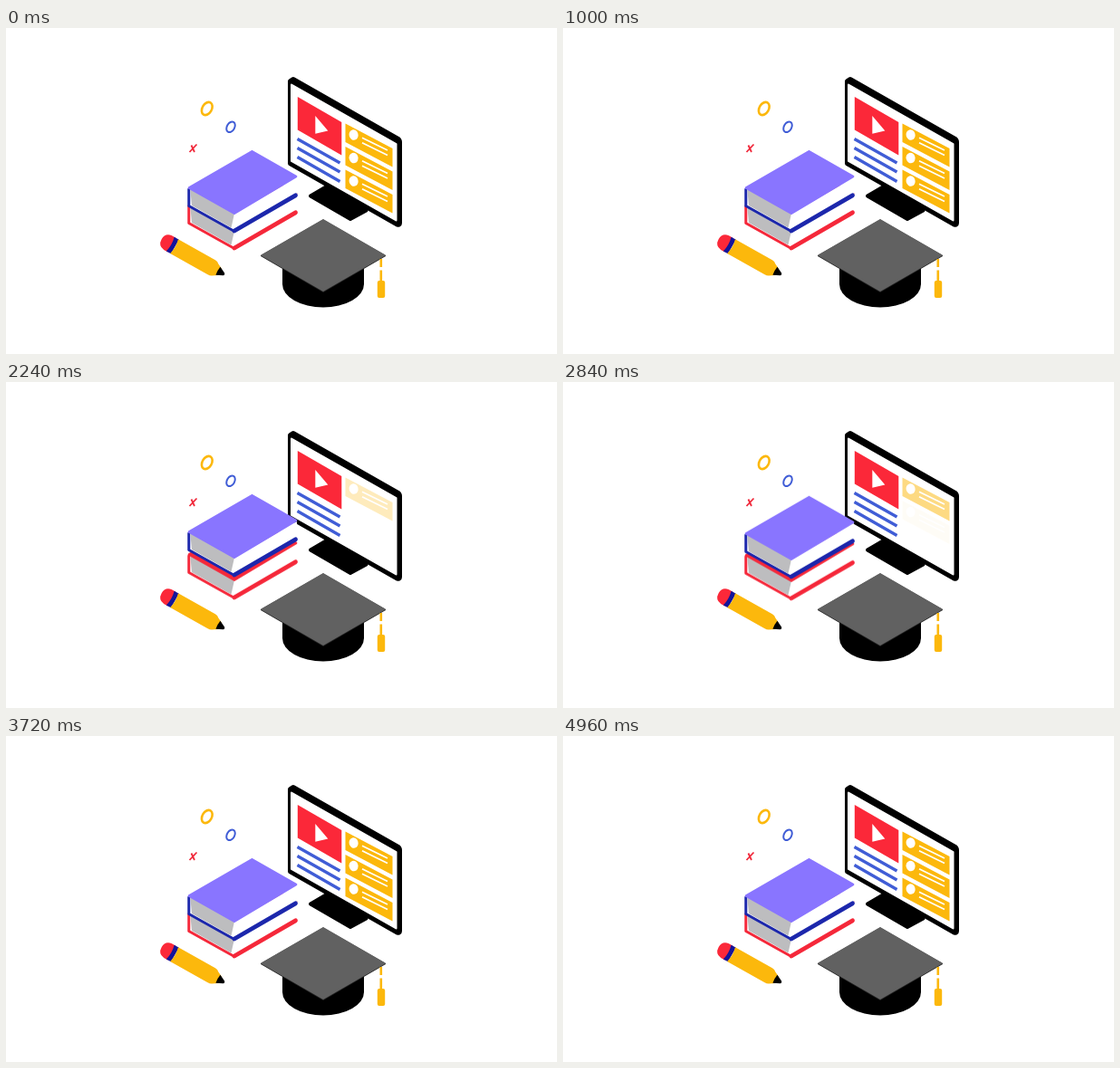
Recreate the animation shown at these times as an HTML page. Size 608 by 360 pixels, loop 5 s.

```html
<!DOCTYPE html>
<html lang="en">
<head>
<meta charset="utf-8">
<title>Online learning</title>
<style>
  html, body { margin: 0; width: 100%; height: 100%; overflow: hidden; background: #fff; }
  svg { display: block; width: 100vw; height: 100vh; }

  .red { fill: #fb2839; }
  .yellow { fill: #fcb80c; }
  .blue-line { fill: none; stroke: #405dd6; }
  .red-line { fill: none; stroke: #f0283a; }
  .yellow-line { fill: none; stroke: #fcb80c; }
  .white-line { fill: none; stroke: #fff; }
  .round { stroke-linejoin: round; stroke-linecap: round; }

  .upper { color: #1c27ac; --lift: -14px; }
  .lower { color: #f5283a; --lift: -6.5px; }
  .book { animation: lift 5s cubic-bezier(.37, 0, .63, 1) infinite; }
  .card1 { animation: card1 5s linear infinite; }
  .card2 { animation: card2 5s linear infinite; }
  .card3 { animation: card3 5s linear infinite; }

  @keyframes lift {
    0%, 33%, 67%, 100% { transform: translateY(0); }
    50% { transform: translateY(var(--lift)); }
  }
  @keyframes card1 {
    0%, 39.8%, 60.2%, 100% { opacity: 1; }
    46.7%, 53.3% { opacity: 0; }
  }
  @keyframes card2 {
    0%, 36.6%, 63.4%, 100% { opacity: 1; }
    43.4%, 56.6% { opacity: 0; }
  }
  @keyframes card3 {
    0%, 33.2%, 66.8%, 100% { opacity: 1; }
    40%, 60% { opacity: 0; }
  }
</style>
</head>
<body>
<svg viewBox="0 0 608 360">
  <defs>
    <g id="card">
      <path class="yellow" d="M374.500 105.500L426.500 133V153.500L374.500 126Z"/>
      <ellipse cx="383.600" cy="118" rx="5" ry="5.800" fill="#fff" transform="rotate(-15 383.600 118)"/>
      <path class="white-line" stroke-width="1.700" d="M393 121.200L421 135M393 126.800L421 140.500"/>
    </g>
    <g id="pages">
      <path fill="#fff" d="M202 0L252 28L321 -12V8L252 47L202 19Z"/>
      <path class="round" fill="none" stroke="currentColor" stroke-width="3" d="M201.800 1V19.500L252 47.500"/>
      <path class="round" fill="none" stroke="currentColor" stroke-width="4.800" d="M252 47L319.500 7.800"/>
      <path fill="#bdbdbf" d="M203.300 1L252 28L248.500 43.500L205 19Z"/>
    </g>
    <path id="cover" class="round" stroke-width="3" d="M271.500 -40.500L319.800 -13L252 27.500L202.300 -.5Z"/>
  </defs>

  <!-- monitor -->
  <path class="round" stroke="#000" stroke-width="4" d="M353 175.500L397.500 201.500L380 211L336 185.500Z"/>
  <path class="round" stroke="#000" stroke-width="6" d="M314 59L317 57L432 122.500Q434 124 434 126V215.500Q434 217.500 431.500 216.500L314 149.500Z"/>
  <path class="round" fill="#fff" stroke="#fff" stroke-width="2" d="M315 62.500L430.500 128V212.500L315 147Z"/>
  <path class="red" d="M321.800 76L370.300 104V140.500L321.800 112.500Z"/>
  <path fill="#fff" d="M341.300 97L355.300 113.500L341.300 116.800Z"/>
  <path class="blue-line" stroke-width="3.300" d="M321.500 122.500L368.500 149M321.500 132.500L368.500 159M321.500 142.500L368.500 169.500"/>
  <g class="card1"><use href="#card"/></g>
  <g class="card2"><use href="#card" y="25.500"/></g>
  <g class="card3"><use href="#card" y="51"/></g>

  <!-- books -->
  <g class="book lower">
    <g transform="translate(0 196)">
      <use href="#pages"/>
      <use href="#cover" fill="currentColor" stroke="currentColor"/>
    </g>
  </g>
  <g class="book upper">
    <g transform="translate(0 177)">
      <use href="#pages"/>
      <use href="#cover" fill="#8975ff" stroke="#8975ff"/>
    </g>
  </g>

  <!-- graduation cap -->
  <path d="M305 255H395V283A45 25.500 0 0 1 305 283Z"/>
  <path class="round" stroke="#222" stroke-width="2" d="M350 212.500L418 251.500L350 291L282 251.500Z"/>
  <path class="round" fill="#616161" stroke="#616161" stroke-width="2" d="M350 212L417.500 251L350 290L282.500 251Z"/>
  <path class="yellow-line" stroke-width="2.600" d="M413.800 255V264M413.800 267.500V281"/>
  <rect class="yellow" x="409.800" y="279" width="8.400" height="19" rx="2"/>

  <!-- pencil -->
  <g transform="translate(179.500 237.600) rotate(29.400)">
    <path class="red" d="M4 -9H-1Q-9 -8 -9 0T-1 9H4Z"/>
    <path fill="#14149a" d="M2 -9H8V9H2Q4.500 0 2 -9Z"/>
    <path class="yellow" d="M7 -9H54Q57 -9 59 -7L65 -4V4L59 8Q57 9 54 9H7Q9.500 0 7 -9Z"/>
    <path d="M62.500 -5.200L70 -1.500Q71.500 0 70 1.500L62.500 5.200Q61.500 0 62.500 -5.200Z"/>
  </g>

  <!-- floating marks -->
  <ellipse class="yellow-line" stroke-width="2.600" cx="221.800" cy="89" rx="5.200" ry="7.600" transform="rotate(30 221.800 89)"/>
  <ellipse class="blue-line" stroke-width="2" cx="248" cy="109.300" rx="4.200" ry="6.200" transform="rotate(30 248 109.300)"/>
  <path class="red-line" stroke-width="1.800" d="M204.500 129.500L208 137M210.500 128.500L202.500 137"/>
</svg>
</body>
</html>
```
